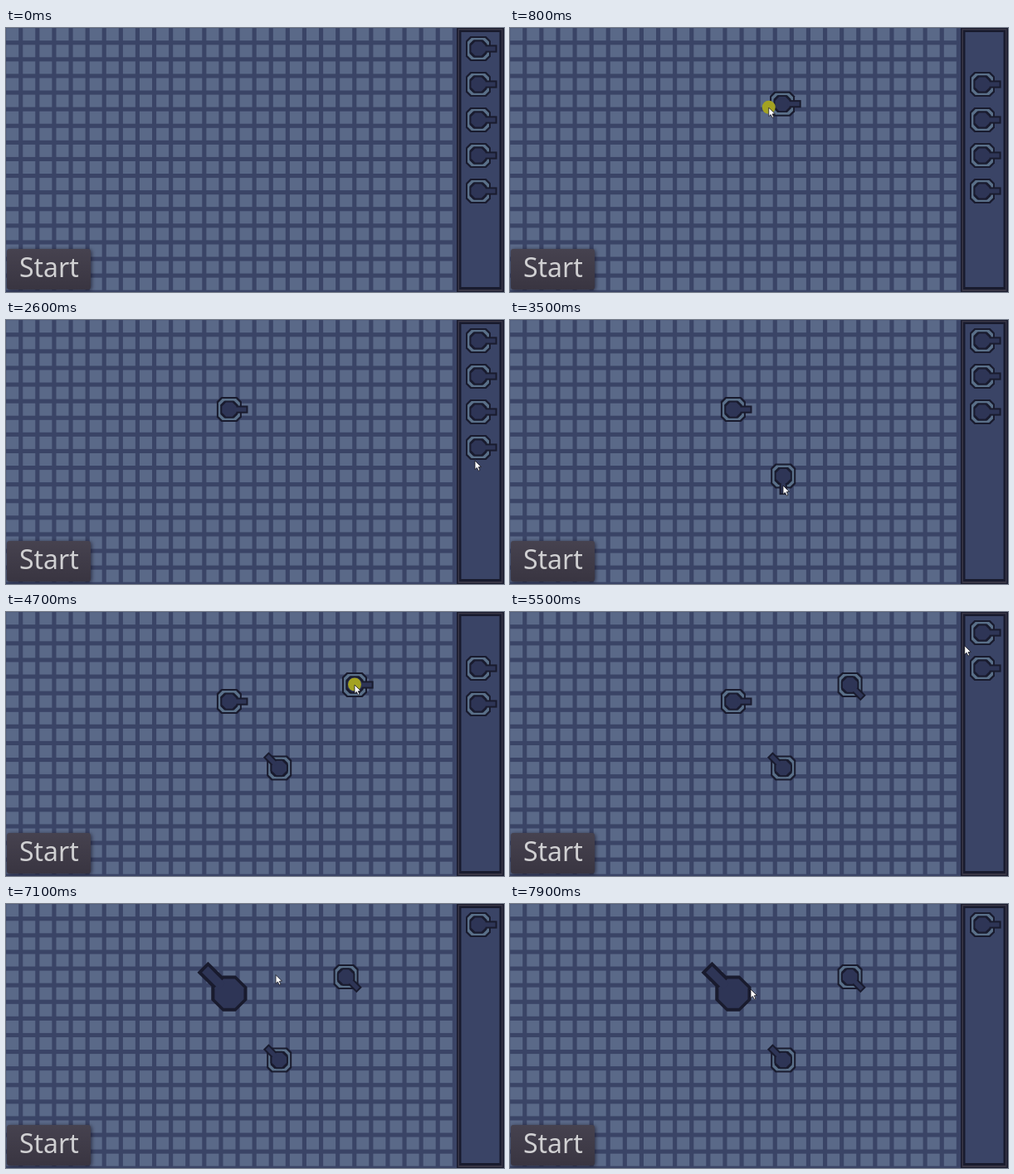
Animation of 600 by 319 pixels, one loop 8000 ms. Source, as an HTML page with a canvas:

```html
<!DOCTYPE html>
<html>
<head>
<meta charset="utf-8">
<style>
  html, body { margin: 0; width: 100%; height: 100%; overflow: hidden; background: #3a4466; }
  canvas { display: block; width: 600px; height: 319px; }
</style>
</head>
<body>
<canvas id="stage" width="600" height="319"></canvas>
<script>
const ctx = document.getElementById('stage').getContext('2d');
const LOOP = 8000, STEP = 100, CELL = 20.1, LAG = 38;
const DARK = '#191b2e', METAL = '#2e3556', RING = '#5a7089', FLOOR = '#3a4466', TILE = '#5a6988';
const EIGHTH = Math.PI / 4;

const cellCenter = n => n * CELL + 7.6;
const slotY = n => 25 + n * 43;

// One turn: pick a turret from a slot, drop it on a cell, aim it, lock the aim (in eighths of a circle).
const turns = [
  { slot: 0, pick: 200, drop: 900, lock: 1100, col: 13, row: 5, aim: 0 },
  { slot: 3, pick: 2700, drop: 3300, lock: 3800, col: 16, row: 9, aim: -3 },
  { slot: 0, pick: 4200, drop: 4800, lock: 5000, col: 20, row: 4, aim: 1 },
  { slot: 0, pick: 5600, drop: 6500, lock: 6900, col: 13, row: 5, aim: -3 }
].map(turn => ({ ...turn, x: cellCenter(turn.col), y: cellCenter(turn.row) }));

// The pointer visits every step of every turn, with a few pauses between.
const pauses = [
  [1500, 573, 154], [1900, 560, 212], [2600, 565, 170], [3500, 329, 200],
  [4600, 420, 88], [4700, 420, 88], [6300, 340, 79],
  [7300, 413, 95], [7700, 194, 70], [7900, 290, 103]
];
const stops = turns.flatMap(({ slot, pick, drop, lock, x, y, aim }) => [
  [pick, 569, slotY(slot)],
  [drop, x, y],
  [lock, x + 45 * Math.cos(aim * EIGHTH), y + 45 * Math.sin(aim * EIGHTH)]
]).concat(pauses).sort((a, b) => a[0] - b[0]);

function pointerAt(t) {
  const next = Math.max(1, stops.findIndex(stop => stop[0] >= t));
  const [t0, x0, y0] = stops[next - 1], [t1, x1, y1] = stops[next];
  const k = Math.max(0, (t - t0) / (t1 - t0));
  return [x0 + (x1 - x0) * k, y0 + (y1 - y0) * k];
}

function aimAt(turn, t) {
  if (t >= turn.lock) return turn.aim * EIGHTH;
  const [x, y] = pointerAt(t);
  return Math.round(Math.atan2(y - turn.y, x - turn.x) / EIGHTH) * EIGHTH;
}

function rect(color, x, y, w, h) {
  ctx.fillStyle = color;
  ctx.fillRect(x, y, w, h);
}

function polygon(color, points) {
  ctx.fillStyle = color;
  ctx.beginPath();
  for (const [x, y] of points) ctx.lineTo(x, y);
  ctx.closePath();
  ctx.fill();
}

function octagon(color, r, cut) {
  const c = r - cut;
  polygon(color, [[-c, -r], [c, -r], [r, -c], [r, c], [c, r], [-c, r], [-r, c], [-r, -c]]);
}

function drawTurret(x, y, angle = 0, scale = 1) {
  ctx.save();
  ctx.translate(x, y);
  if (scale === 1) {
    octagon(DARK, 15, 5.5);
    octagon(RING, 13, 4.8);
    octagon(DARK, 10.4, 4.5);
  }
  ctx.rotate(angle);
  ctx.scale(scale, scale);
  octagon(DARK, 10.4, 5.5);
  rect(DARK, 6, -4.6, 16.6, 9.2);
  octagon(METAL, 8.6, 4.8);
  rect(METAL, 6, -2.6, 14.6, 5.2);
  ctx.restore();
}

function drawFloor() {
  rect(FLOOR, 0, 0, 600, 319);
  for (let row = 0; row < 16; row++)
    for (let col = 0; col < 27; col++)
      rect(TILE, col * CELL + 0.2, row * CELL + 0.2, 15, 15);
}

function drawPanel(t, held) {
  rect(DARK, 543, 0, 57, 319);
  rect('#393746', 544.5, 1, 54, 317);
  rect(DARK, 546, 2.5, 51, 313.5);
  rect(FLOOR, 548.5, 5, 46, 308);
  const dropped = turns.filter(turn => t >= turn.drop).length;
  for (let slot = 0; slot < 5 - dropped; slot++)
    if (!held || held.slot !== slot) drawTurret(569, slotY(slot));
}

function drawButton() {
  ctx.save();
  ctx.shadowColor = 'rgba(20,18,35,.75)';
  ctx.shadowBlur = 5;
  ctx.shadowOffsetX = ctx.shadowOffsetY = 1;
  const shade = ctx.createLinearGradient(0, 267, 0, 316);
  shade.addColorStop(0, '#46424f');
  shade.addColorStop(1, '#393541');
  ctx.fillStyle = shade;
  ctx.beginPath();
  ctx.roundRect(1, 267, 101, 49, 3);
  ctx.fill();
  ctx.restore();
  ctx.save();
  ctx.filter = 'blur(0.5px)';
  ctx.fillStyle = '#d0d0d2';
  ctx.font = '32px "Noto Sans", sans-serif';
  ctx.fillText('Start', 16, 301);
  ctx.restore();
}

function drawPointer(x, y) {
  ctx.save();
  ctx.translate(x, y);
  polygon('#fff', [[0, 0], [0, 10.5], [2.4, 8.4], [4.2, 12.2], [6, 11.4], [4.3, 7.7], [7.5, 7.5]]);
  ctx.strokeStyle = '#15151f';
  ctx.lineWidth = 0.8;
  ctx.stroke();
  ctx.restore();
}

function render(t) {
  const held = turns.find(turn => t >= turn.pick && t < turn.drop);
  const placed = turns.filter(turn => t >= turn.drop);
  drawFloor();
  drawPanel(t, held);
  drawButton();
  // A turret dropped on another one merges with it into a double-sized turret.
  for (const turn of placed) {
    const sameCell = placed.filter(({ col, row }) => col === turn.col && row === turn.row);
    if (turn === sameCell[sameCell.length - 1])
      drawTurret(turn.x, turn.y, aimAt(turn, t), sameCell.length);
  }
  if (t < stops[0][0]) return;
  const [x, y] = pointerAt(t);
  if (held) {
    drawTurret(...pointerAt(t - LAG));
    ctx.fillStyle = '#a3a222';
    ctx.beginPath();
    ctx.arc(x, y - 0.5, 8, 0, 2 * Math.PI);
    ctx.fill();
  }
  drawPointer(x, y);
}

const start = performance.now();
function tick() {
  const t = (performance.now() - start) % LOOP;
  render(Math.floor(t / STEP) * STEP);
  requestAnimationFrame(tick);
}
tick();
</script>
</body>
</html>
```
